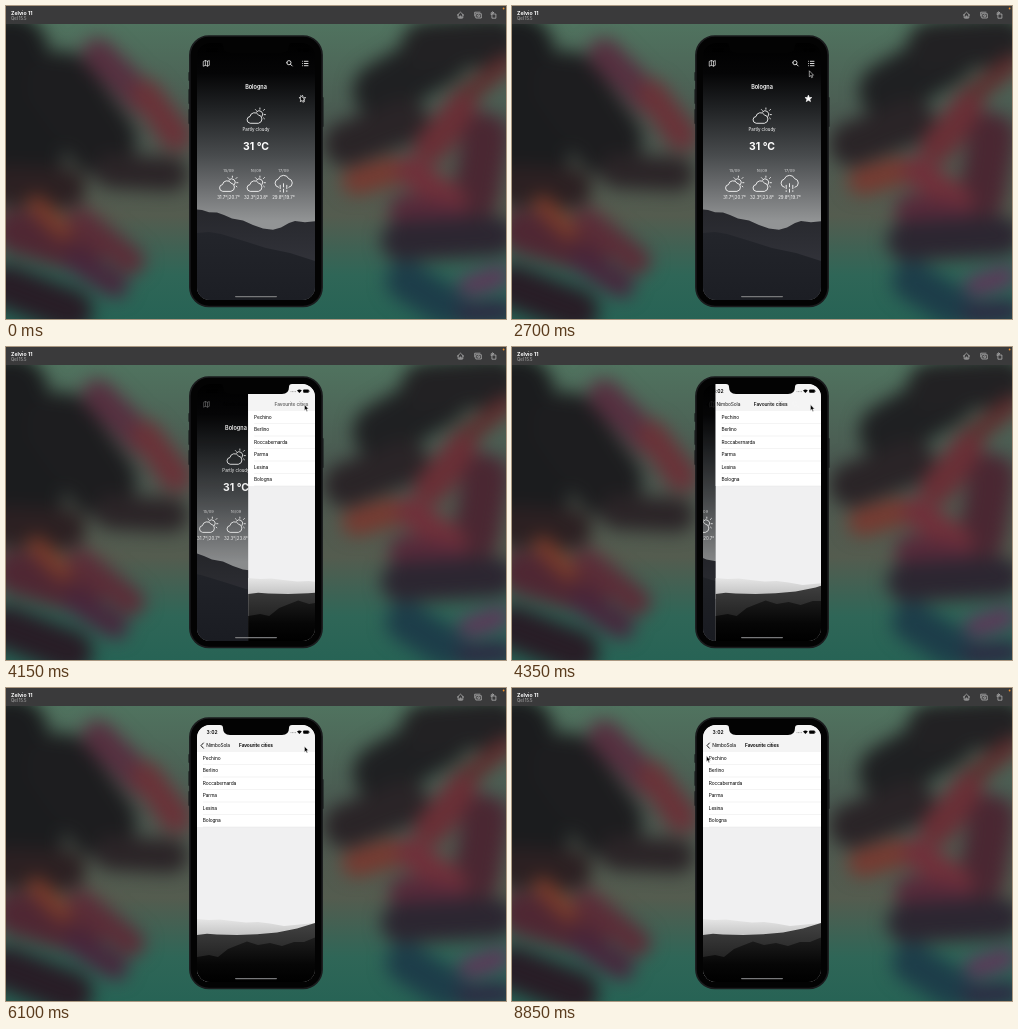
Recreate the animation shown at these times as an HTML page. Size 500 by 313 pixels, loop 8900 ms.

```html
<!DOCTYPE html>
<html lang="en">
<head>
<meta charset="utf-8">
<title>Weather app demo</title>
<style>
  html, body { margin: 0; width: 100%; height: 100%; overflow: hidden; background: #222; }
  svg { display: block; width: 100vw; height: 100vh; }
  text { font-family: Inter, Roboto, "Liberation Sans", sans-serif; }
  .mid { text-anchor: middle; fill: #fff; }
  .bold { font-weight: 600; }
  .line { fill: none; stroke: #fff; stroke-width: .85; stroke-linecap: round; stroke-linejoin: round; }
  .thin { stroke-width: .65; }
  .tight { letter-spacing: -.12px; font-size: 4.85px; }
</style>
</head>
<body>
<svg viewBox="0 0 500 313" preserveAspectRatio="none">
  <defs>
    <filter id="blur" filterUnits="userSpaceOnUse" x="-60" y="-60" width="620" height="440" color-interpolation-filters="sRGB">
      <feGaussianBlur stdDeviation="9"/>
    </filter>
    <clipPath id="screen"><rect x="191" y="37" width="118" height="257" rx="13"/></clipPath>
    <linearGradient id="base" x1="0" y1="18" x2="0" y2="313" gradientUnits="userSpaceOnUse">
      <stop offset="0" stop-color="#50735f"/>
      <stop offset=".35" stop-color="#4a5850"/>
      <stop offset=".65" stop-color="#545c4f"/>
      <stop offset=".85" stop-color="#2f6657"/>
      <stop offset="1" stop-color="#276355"/>
    </linearGradient>
    <linearGradient id="sky" x1="0" y1="37" x2="0" y2="215" gradientUnits="userSpaceOnUse">
      <stop offset="0" stop-color="#000"/>
      <stop offset=".17" stop-color="#050506"/>
      <stop offset=".36" stop-color="#1f2123"/>
      <stop offset=".63" stop-color="#484b4d"/>
      <stop offset=".8" stop-color="#696b6d"/>
      <stop offset="1" stop-color="#929495"/>
    </linearGradient>
    <linearGradient id="hillBack" x1="0" y1="204" x2="0" y2="260" gradientUnits="userSpaceOnUse">
      <stop offset="0" stop-color="#26272c"/>
      <stop offset="1" stop-color="#32333a"/>
    </linearGradient>
    <linearGradient id="hillFront" x1="0" y1="225" x2="0" y2="294" gradientUnits="userSpaceOnUse">
      <stop offset="0" stop-color="#23252b"/>
      <stop offset="1" stop-color="#1c1e24"/>
    </linearGradient>
    <linearGradient id="fog" x1="0" y1="230" x2="0" y2="249" gradientUnits="userSpaceOnUse">
      <stop offset="0" stop-color="#e8e8e8"/>
      <stop offset="1" stop-color="#c0c0c0"/>
    </linearGradient>
    <linearGradient id="ridge" x1="0" y1="235" x2="0" y2="272" gradientUnits="userSpaceOnUse">
      <stop offset="0" stop-color="#424242"/>
      <stop offset="1" stop-color="#222"/>
    </linearGradient>
    <linearGradient id="ridgeFront" x1="0" y1="250" x2="0" y2="294" gradientUnits="userSpaceOnUse">
      <stop offset="0" stop-color="#1d1d1d"/>
      <stop offset=".6" stop-color="#060606"/>
      <stop offset="1" stop-color="#000"/>
    </linearGradient>
    <g id="cloudSun" class="line">
      <path d="M-5.5 7A3.4 3.4 0 0 1-5.3.3A4.6 4.6 0 0 1 3.2-1.2A4.2 4.2 0 0 1 3.5 7Z"/>
      <path d="M1.2-4.3A3.6 3.6 0 0 1 6.8.2M4.6-8.2V-7M9.2-6.8 8.2-5.8M10.1-1.6H8.9M.2-6.6 1-5.8M9.1 2.5 8.3 1.8"/>
    </g>
    <g id="cloudRain" class="line">
      <path d="M-5 3A4.2 4.2 0 0 1-5.2-5.2A5.6 5.6 0 0 1 5.2-5.6A4.4 4.4 0 0 1 5.4 3"/>
      <path d="M-3.3 1V4.4M0-.6V2.6M3.3 1V4.4M-3.3 6.4V7.2M0 4.9V7.9M3.3 6.4V7.2"/>
    </g>
  </defs>

  <rect width="500" height="313" fill="url(#base)"/>
  <g id="wall" filter="url(#blur)" fill="none" stroke-linecap="round"></g>

  <rect width="500" height="18" fill="#3a3a3b"/>
  <text x="5" y="8.8" font-size="5.2" font-weight="700" fill="#fff">Zelvio 11</text>
  <text x="5" y="14" font-size="4.2" fill="#b5b5b5">Qel 15.5</text>
  <g class="line thin" style="stroke:#c8c8c8">
    <path d="M451.3 9.2 454.5 6.2 457.7 9.2M452.2 8.6V12H456.8V8.6M453.9 12V10H455.1V12"/>
    <path d="M468.7 10V6.2H474M470.2 7.7H475.3V12H470.2ZM471.7 9.8A1 1 0 1 0 473.7 9.8A1 1 0 1 0 471.7 9.8"/>
    <path d="M486.3 8H489.9V12.2H486.3ZM485.2 8.6V6.7H487.5M486.6 5.7 487.6 6.7 486.6 7.7"/>
  </g>
  <circle cx="497.6" cy="2.5" r=".9" fill="#f0902a"/>

  <g fill="#111214">
    <rect x="182.5" y="66" width="3" height="9" rx=".8"/>
    <rect x="182.5" y="83" width="3" height="15" rx=".8"/>
    <rect x="182.5" y="103" width="3" height="15" rx=".8"/>
    <rect x="314.5" y="91" width="3" height="30" rx=".8"/>
  </g>
  <rect x="183.9" y="30" width="132.2" height="270.5" rx="19" fill="#030303" stroke="#1a1b1d" stroke-width="1.6"/>

  <g clip-path="url(#screen)">
    <g id="home">
      <rect x="191" y="37" width="118" height="257" fill="url(#sky)"/>
      <path fill="url(#hillBack)" d="M191 203.5 196 204 203 206.3 211 206.5 218 209 226 212.5 237 214.5 247 219 257 222.5 267 223.8 275 221.5 283 217 289 215 299 216.3 309 215.3V294H191Z"/>
      <path fill="url(#hillFront)" d="M191 227 203 226 215 228 238 235 260 242 284 247 309 255V294H191Z"/>
      <text class="mid bold" x="250" y="83" font-size="5.5">Bologna</text>
      <use href="#cloudSun" x="249.3" y="110.2"/>
      <text class="mid" x="250" y="124.9" font-size="4.4">Partly cloudy</text>
      <text class="mid" x="250" y="144" font-size="10.4" font-weight="700">31 °C</text>
      <g id="days"></g>
      <path id="star" stroke="#fff" stroke-width=".6" stroke-linejoin="round"/>
    </g>
    <rect id="dim" x="191" y="37" width="118" height="257"/>
    <g id="list">
      <rect x="191" y="37" width="118" height="257" fill="#f0f0f1"/>
      <rect x="191" y="37" width="118" height="27" fill="#f4f4f4"/>
      <rect x="191" y="64" width="118" height="75" fill="#fff"/>
      <g id="rows"></g>
      <path fill="url(#fog)" d="M191 231 203 232 214 231.5 226 233 240 234.5 252 234 264 235.5 278 238 309 235V252H191Z"/>
      <path fill="url(#ridge)" d="M191 247 201 245.8 211 246.5 231 247 251 246.3 271 244.5 291 240.5 309 235V294H191Z"/>
      <path fill="url(#ridgeFront)" d="M191 269 203 267 212 269 222 261 232 257 241 253.5 252 257 264 255 276 258 288 254 298 254 309 249.5V294H191Z"/>
    </g>
    <g id="icons" class="line">
      <path class="thin" d="M197.6 55.3 199.4 54.5 201.5 55.3 203.3 54.5V59.3L201.5 60.1 199.4 59.3 197.6 60.1ZM199.4 54.5V59.3M201.5 55.3V60.1"/>
      <path d="M280.8 56.7A2.1 2.1 0 1 0 285 56.7A2.1 2.1 0 1 0 280.8 56.7M284.5 58.3 286.2 60"/>
      <path id="menu" d="M296.6 55.3H296.7M296.6 57.5H296.7M296.6 59.7H296.7M298.4 55.3H302M298.4 57.5H302M298.4 59.7H302"/>
    </g>
    <g id="bar">
      <path id="chevron" d="M197.4 55 195 57.6 197.4 60.2" fill="none" stroke="#000" stroke-width=".9" stroke-linecap="round" stroke-linejoin="round"/>
      <text id="back" class="tight" x="200.2" y="59.3">NimboSola</text>
      <text id="title" class="tight bold" x="233" y="59.3">Favourite cities</text>
    </g>
    <text x="200.4" y="46.4" font-size="5" class="bold">3:02</text>
    <path d="M284.5 44.6H290" stroke="#000" stroke-opacity=".3" stroke-width="1" stroke-dasharray="1 .5"/>
    <path d="M291 43.4Q293.4 41.4 295.8 43.4L293.4 46Z"/>
    <rect x="297.2" y="42.5" width="5.6" height="3.2" rx=".8"/>
    <rect x="303.1" y="43.5" width=".5" height="1.2" rx=".2"/>
    <path d="M214 36H286V37Q283 37 283 40Q283 47 276 47H224Q217 47 217 40Q217 37 214 37Z" fill="#030303"/>
    <rect x="229" y="289.9" width="42" height="1.4" rx=".7" fill="#77787a"/>
  </g>

  <path id="cursor" d="M0 0V6L1.4 4.8 2.3 6.9 3.3 6.5 2.4 4.4H4.2Z" fill="#000" stroke="#fff" stroke-width=".55" stroke-linejoin="round"/>
</svg>
<script>
  const LOOP = 8900, STEP = 50;
  const $ = id => document.getElementById(id);

  // Blurred wallpaper strokes: colour, width, then x1, y1, x2, y2
  const strokes = [
    ["#1b1c1e", 75, 5, 45, 20, 150],
    ["#1d1d1f", 70, 55, 80, 95, 135],
    ["#563040", 32, 92, 48, 135, 92],
    ["#6a3238", 30, 140, 88, 170, 130],
    ["#2b2427", 34, 105, 165, 165, 168],
    ["#2c2022", 40, 0, 180, 60, 182],
    ["#4f2733", 44, 10, 225, 75, 245],
    ["#7a3b2a", 18, 30, 198, 58, 225],
    ["#5b2d38", 28, 75, 215, 125, 255],
    ["#47263c", 24, 70, 255, 110, 280],
    ["#281d26", 44, 0, 280, 65, 305],
    ["#1f2022", 56, 375, 85, 435, 50],
    ["#222123", 50, 420, 40, 490, 35],
    ["#2a2427", 44, 340, 138, 400, 115],
    ["#5d2d2e", 20, 500, 58, 452, 95],
    ["#6a2f36", 34, 455, 105, 425, 140],
    ["#4a2732", 46, 480, 130, 470, 190],
    ["#763a31", 28, 350, 175, 385, 165],
    ["#70303a", 30, 405, 165, 445, 195],
    ["#56293a", 34, 400, 205, 445, 215],
    ["#2c2631", 40, 395, 235, 490, 230],
    ["#1d3d49", 40, 400, 275, 440, 300],
    ["#623259", 18, 462, 280, 495, 270],
    ["#2c2440", 20, 460, 308, 500, 305]
  ];
  $("wall").innerHTML = strokes.map(([color, width, x1, y1, x2, y2]) =>
    `<path d="M${x1} ${y1}L${x2} ${y2}" stroke="${color}" stroke-width="${width}"/>`).join("");

  const days = [
    ["15/09", "31.7°|20.7°", "cloudSun"],
    ["16/09", "32.3°|23.8°", "cloudSun"],
    ["17/09", "29.8°|19.7°", "cloudRain"]
  ];
  $("days").innerHTML = days.map(([date, temp, icon], i) => {
    const x = 222.5 + 27.5 * i;
    const dx = icon === "cloudSun" ? -.7 : 0;
    return `<text class="mid" x="${x}" y="165.8" font-size="4" opacity=".75">${date}</text>
      <use href="#${icon}" x="${x + dx}" y="178.3"/>
      <text class="mid" x="${x}" y="192.7" font-size="4.4">${temp}</text>`;
  }).join("");

  const cities = ["Pechino", "Berlino", "Roccabernarda", "Parma", "Lesina", "Bologna"];
  $("rows").innerHTML = cities.map((city, i) => {
    const y = 64 + 12.5 * i;
    return `<text class="tight" x="196.8" y="${y + 7.9}">${city}</text>
      <path d="M197 ${y + 12.5}H309" stroke="#dedede" stroke-width=".35"/>`;
  }).join("");

  const starPoints = Array.from({ length: 10 }, (_, i) => {
    const r = i % 2 ? 1.6 : 3.6, a = (i * 36 - 90) * Math.PI / 180;
    return `${(296.4 + r * Math.cos(a)).toFixed(2)} ${(92.7 + r * Math.sin(a)).toFixed(2)}`;
  });
  $("star").setAttribute("d", `M${starPoints.join("L")}Z`);

  const smooth = p => p * p * (3 - 2 * p);
  const easeOut = p => Math.sin(p * Math.PI / 2);

  // Pointer moves: start, end, x, y, easing
  const start = [294.6, 89.5];
  const moves = [
    [2200, 3050, 298, 58.5, easeOut],
    [3100, 3350, 298.2, 57.3, smooth],
    [3550, 3650, 298.4, 57.6, smooth],
    [5450, 5550, 298.4, 58.2, smooth],
    [6100, 6500, 254.3, 83, smooth],
    [7150, 7650, 192.2, 93, smooth],
    [8050, 8150, 192.2, 93.4, smooth],
    [8500, 8850, 194.4, 67.8, smooth]
  ];

  function pointer(t) {
    let [x, y] = start;
    for (const [from, to, nx, ny, ease] of moves) {
      if (t < from) break;
      const p = ease(Math.min(1, (t - from) / (to - from)));
      x += (nx - x) * p;
      y += (ny - y) * p;
    }
    return [x, y];
  }

  // Remaining share of the push, a critically damped spring
  function remaining(t) {
    if (t < 4000) return 1;
    if (t >= 4900) return 0;
    const s = 9.5 * (t - 3950) / 1000;
    return (1 + s) * Math.exp(-s);
  }

  const shift = (id, x, y = 0) => $(id).setAttribute("transform", `translate(${x} ${y})`);
  const fade = (id, value) => $(id).setAttribute("opacity", value);

  function draw(t) {
    const left = remaining(t), done = 1 - left;
    shift("home", -35.4 * done);
    shift("list", 118 * left);
    fade("dim", .1 * done);
    fade("icons", left);
    fade("menu", t < 3550 ? 1 : t < 3600 ? .5 : .15);
    fade("bar", t < 4000 ? 0 : 1);
    fade("chevron", done);
    fade("back", done);
    fade("title", done);
    shift("back", 40 * left);
    shift("title", 82 * left);
    $("star").setAttribute("fill", t < 1150 ? "none" : "#fff");
    fade("star", t >= 1150 && t < 1200 ? .6 : 1);
    shift("cursor", ...pointer(t));
  }

  function tick(now) {
    draw(Math.floor(now % LOOP / STEP) * STEP);
    requestAnimationFrame(tick);
  }
  draw(0);
  requestAnimationFrame(tick);
</script>
</body>
</html>
```
